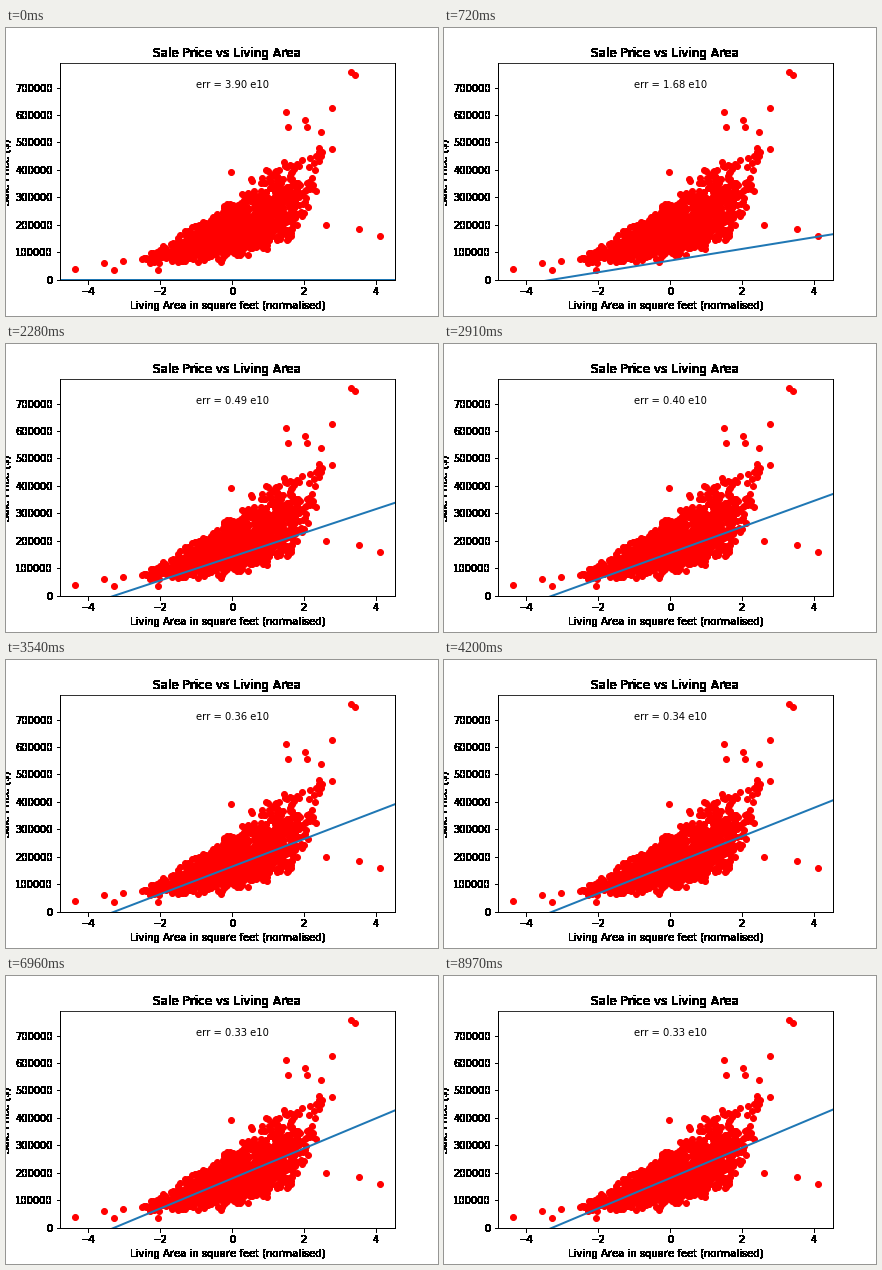
A matplotlib script that plays this animation: 432 px wide and 288 px high, repeating every 9000 ms.

```python
import numpy as np
import matplotlib.pyplot as plt
from matplotlib.animation import FuncAnimation

FRAMES, INTERVAL = 300, 30
MEAN, SLOPE, DECAY = 180921, 55200, 0.98   # least-squares fit, step factor
ERR_MIN, ERR_SPAN = 0.326, 3.578           # in units of 1e10

# The most isolated houses: normalised log area, price in thousands
OUTLIERS = [
    (-4.367, 39.3), (-3.555, 60), (-3.28, 35.3), (-3.04, 68.5),
    (-2.06, 34.9), (-0.03, 392), (1.5, 612), (1.555, 555), (2.035, 583),
    (2.085, 557), (2.485, 538), (2.77, 475), (2.78, 625), (2.61, 197.5),
    (3.304, 755), (3.413, 745), (3.545, 185), (4.108, 160),
]


def make_houses(count=1400, seed=4):
    """Log-linear price cloud, trimmed by two curves, plus a thin halo."""
    rng = np.random.default_rng(seed)
    x = rng.normal(0, 1, 2 * count)
    price = np.exp(5.12 + 0.29 * x + 0.26 * rng.normal(size=x.size))
    low, high = 58 + 4.5 * np.exp(1.8 * x), 290 + 85 * x
    keep = (np.abs(x) < 2.5) & (price > low) & (price < high)
    cloud = np.column_stack([x, price])[keep][:count]

    hx = rng.uniform(0.5, 2.6, 34)
    halo = np.column_stack([hx, rng.uniform(310, 400 + 30 * hx)])
    return np.vstack([cloud, halo, OUTLIERS])


def solid_ink(img, dpi):
    """Turn every touched pixel fully black."""
    ink = np.zeros_like(img)
    ink[..., 3] = img[..., 3] > 0
    return ink, 0, 0


plt.rcParams["text.kerning_factor"] = 6
fig = plt.figure(figsize=(6, 4), dpi=72, facecolor="white")
ax = fig.add_axes([0.125, 0.125, 0.775, 0.755])
area, price = make_houses().T
ax.scatter(area, price * 1000, s=36, color="red")

ax.set_title("Sale Price vs Living Area")
ax.set_xlabel("Living Area in square feet (normalised)")
ax.set_ylabel("Sale Price ($)")
ax.set_xticks(range(-4, 5, 2))
ax.set_yticks(range(0, 700001, 100000))
ax.set_xlim(-4.791, 4.532)
ax.set_ylim(-1105, 791005)

edges = [ax.spines[side] for side in ("left", "right", "bottom")]
for artist in (ax.title, ax.xaxis, ax.yaxis, *edges):
    artist.set_agg_filter(solid_ink)

span = np.array([-5.0, 5.0])
line, = ax.plot([], [], color="#1f77b4", lw=2)
err = ax.text(-1, 700000, "")


def update(i):
    left = DECAY ** i
    line.set_data(span, (1 - left) * (MEAN + SLOPE * span))
    err.set_text(f"err = {ERR_MIN + ERR_SPAN * left ** 2:.2f} e10")
    return line, err


anim = FuncAnimation(fig, update, frames=FRAMES, interval=INTERVAL,
                     repeat=True, repeat_delay=0)
plt.show()
```
